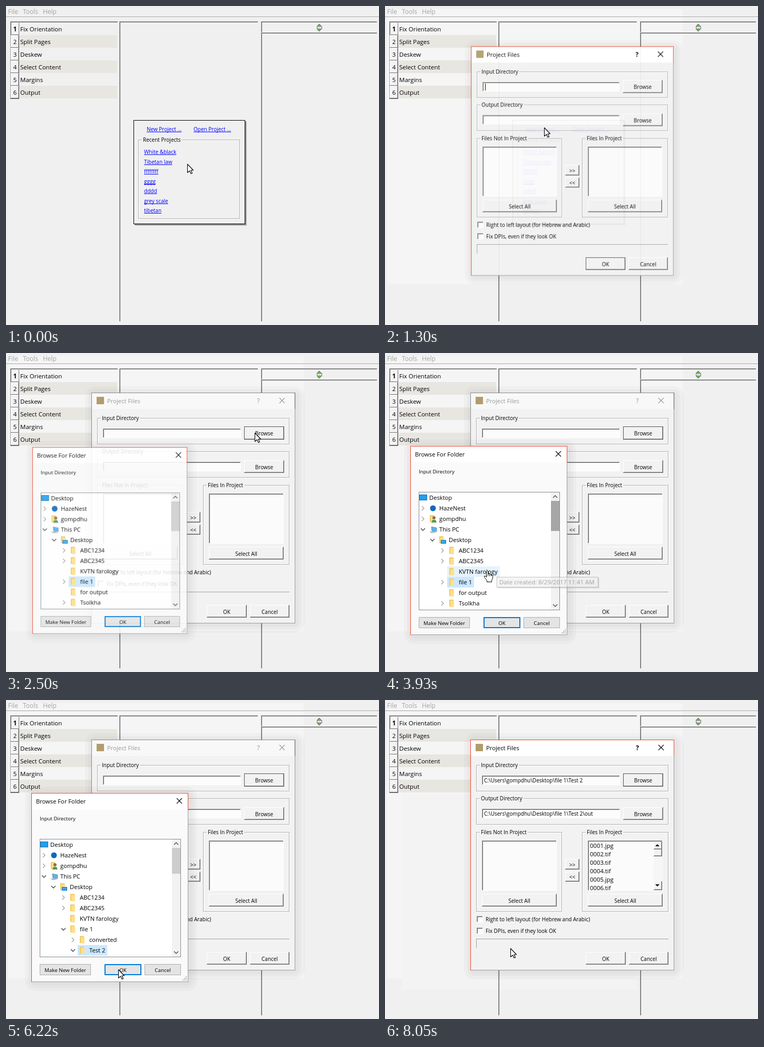
These frames come from a looping animation (708x604 px, 8700 ms). An HTML page with a canvas:

```html
<!DOCTYPE html>
<html lang="en">
<head>
<meta charset="utf-8">
<title>Project setup</title>
<style>
html, body { margin: 0; width: 708px; height: 604px; overflow: hidden; background: #f0f0f0; }
canvas { display: block; }
</style>
</head>
<body>
<canvas id="stage" width="708" height="604"></canvas>
<script>
const W = 708, H = 604, LOOP = 8700;
const stage = document.getElementById('stage');
const main = stage.getContext('2d');
const buffer = Object.assign(document.createElement('canvas'), { width: W, height: H });
const spare = buffer.getContext('2d');
let g = main;

const FACE = '#f0f0f0', BODY = '#f2f2f2', MID = '#a0a0a0', DARK = '#696969', RED = '#f2452f';
const USER = 'gompdhu';
const clamp = v => Math.max(0, Math.min(1, v));

// Progress that is held between evenly spaced screen updates.
function stepped(t, start, end, n) {
  if (t < start) return 0;
  const gap = n > 1 ? (end - start) / (n - 1) : Infinity;
  return Math.min(n, Math.floor((t - start + 20) / gap) + 1) / n;
}

function box(x, y, w, h, color) {
  g.fillStyle = color;
  g.fillRect(x, y, w, h);
}

function frame(x, y, w, h, color) {
  g.strokeStyle = color;
  g.lineWidth = 1;
  g.strokeRect(x + .5, y + .5, w - 1, h - 1);
}

function path(points, color, width = 1, close = false, fill) {
  g.beginPath();
  points.forEach(([x, y]) => g.lineTo(x, y));
  if (close) g.closePath();
  if (fill) { g.fillStyle = fill; g.fill(); }
  if (color) { g.strokeStyle = color; g.lineWidth = width; g.stroke(); }
}

function disc(x, y, r, color) {
  g.fillStyle = color;
  g.beginPath();
  g.arc(x, y, r, 0, Math.PI * 2);
  g.fill();
}

// Text is placed by the middle of its line; returns its width.
function text(str, x, mid, { size = 10, color = '#000', align = 'left', weight = '' } = {}) {
  g.font = `${weight} ${size}px "Open Sans", "Noto Sans", sans-serif`;
  g.textAlign = align;
  g.fillStyle = color;
  g.fillText(str, x, mid + Math.round(size * .36));
  return g.measureText(str).width;
}

function sunken(x, y, w, h, fill) {
  box(x, y, w, h, '#fff');
  box(x, y, w - 1, h - 1, MID);
  box(x + 1, y + 1, w - 2, h - 2, DARK);
  box(x + 2, y + 2, w - 3, h - 3, fill);
}

function raised(x, y, w, h) {
  box(x, y, w, h, DARK);
  box(x, y, w - 1, h - 1, '#fff');
  box(x + 1, y + 1, w - 2, h - 2, MID);
  box(x + 1, y + 1, w - 3, h - 3, BODY);
}

function button(label, x, y, w, h, focus) {
  raised(x, y, w, h);
  if (focus) frame(x, y, w, h, '#555');
  text(label, x + w / 2, y + h / 2 + .5, { align: 'center' });
}

function group(label, x, y, w, h, fill = BODY) {
  frame(x + 1, y + 1, w, h, '#fff');
  frame(x, y, w, h, '#b0b0b0');
  g.font = '10px "Open Sans", "Noto Sans", sans-serif';
  box(x + 7, y - 4, g.measureText(label).width + 4, 9, fill);
  text(label, x + 9, y);
}

function shadow(x, y, w, h) {
  g.fillStyle = 'rgba(0,0,0,.025)';
  for (const grow of [15, 9, 4]) {
    g.beginPath();
    g.roundRect(x + 3 - grow, y + 3 - grow, w + grow * 2, h + grow * 2, grow + 5);
    g.fill();
  }
}

// Draws a window, zooming slightly while it is see-through.
function fadeLayer(alpha, cx, cy, draw) {
  if (alpha <= 0) return;
  if (alpha >= 1) return draw();
  spare.clearRect(0, 0, W, H);
  g = spare;
  draw();
  g = main;
  const zoom = .9 + .1 * alpha;
  g.save();
  g.globalAlpha = alpha;
  g.translate(cx, cy);
  g.scale(zoom, zoom);
  g.drawImage(buffer, -cx, -cy);
  g.restore();
}

function cross(x, y, color) {
  path([[x - 5, y - 5], [x + 5, y + 5]], color, 1.1);
  path([[x + 5, y - 5], [x - 5, y + 5]], color, 1.1);
}

function edges(x, y, w, h, titleH, active) {
  frame(x, y, w, h, '#9a9a9a');
  const c = active ? RED : '#8c8c8c';
  box(x, y, w, 1, c);
  box(x, y, 1, h, c);
  box(x + w - 1, y, 1, titleH, active ? RED : '#555');
}

// Top and left side of a sunken panel.
function corner(x, y, w, h) {
  box(x, y, w, 1, MID);
  box(x, y, 1, h, MID);
  box(x + 1, y + 1, w - 1, 1, DARK);
  box(x + 1, y + 1, 1, h - 1, DARK);
}

function mainWindow(t) {
  box(0, 0, W, H, FACE);
  if (t >= 1040) box(4, 6, 561, 521, '#f5f5f5');
  if (t >= 6760) box(32, 178, 446, 371, '#f3f3f3');

  [['File', 4], ['Tools', 32], ['Help', 70]].forEach(([s, x]) =>
    text(s, x, 11, { size: 12, color: '#a3a3a3' }));
  box(0, 20, W, 1, MID);
  box(0, 21, W, 1, '#fff');

  corner(8, 29, 204, 147);
  ['Fix Orientation', 'Split Pages', 'Deskew', 'Select Content', 'Margins', 'Output'].forEach((s, i) => {
    const y = 32 + i * 24;
    if (i % 2) box(25, y - 1, 186, 24, '#e8e6e1');
    box(9, y, 15, 24, '#f3f3f3');
    box(9, y, 1, 24, i ? '#fff' : DARK);
    box(23, y, 1, 24, i ? MID : '#fff');
    box(24, y, 1, 24, DARK);
    if (i) box(9, y - 1, 15, 1, '#fff');
    box(9, y + 22, 16, 1, DARK);
    text(i + 1, 17, y + 12, { size: 11.5, align: 'center', weight: i ? '' : 'bold' });
    text(s, 27, y + 12, { size: 11.5 });
  });
  box(8, 175, 17, 1, DARK);

  corner(215, 29, 263, 568);
  corner(484, 29, 220, 21);
  box(485, 49, 219, 1, '#fff');
  corner(484, 50, 220, 547);

  path([[594.5, 34], [599, 39], [590, 39]], '#2f6e1f', 1, true, '#6cc04a');
  path([[594.5, 48], [599, 43], [590, 43]], '#2f6e1f', 1, true, '#6cc04a');
  box(590, 38, 10, 6, '#777');
  box(591, 39, 8, 4, '#dcdcdc');
}

function link(str, x, mid) {
  const w = text(str, x, mid, { color: '#00f' });
  box(x, Math.round(mid) + 5, w, 1, '#00f');
}

function startPanel() {
  box(245, 219, 212, 197, '#c4c4c4');
  box(244, 218, 212, 197, '#8f8f8f');
  box(242, 216, 212, 197, '#000');
  box(243, 217, 210, 195, FACE);
  link('New Project ...', 267, 233);
  link('Open Project ...', 356, 233);
  group('Recent Projects', 251, 253, 193, 150, FACE);
  ['White &black', 'Tibetan law', 'ffffffff', 'gggg', 'dddd', 'grey scale', 'tibetan']
    .forEach((s, i) => link(s, 262, Math.round(276 + i * 18.5)));
}

function fileList() {
  g.save();
  g.beginPath();
  g.rect(387, 268, 140, 92);
  g.clip();
  for (let i = 1; i <= 6; i++)
    text(`000${i}.${i % 4 === 1 ? 'jpg' : 'tif'}`, 389, 260 + i * 16, { size: 11.3 });
  box(510, 268, 17, 92, '#f6f6f6');
  raised(510, 268, 16, 15);
  raised(510, 283, 16, 13);
  raised(510, 343, 16, 17);
  path([[513, 277], [521, 277], [517, 273]], null, 0, true, '#000');
  path([[513, 349], [521, 349], [517, 353]], null, 0, true, '#000');
  g.restore();
}

function projectDialog(t) {
  const filled = t >= 6900, active = t < 2090 || filled, browsing = t >= 2090;
  const ink = active ? '#000' : '#999';
  shadow(162, 75, 387, 436);
  box(162, 75, 387, 436, BODY);
  box(162, 75, 387, 31, active ? '#fff' : '#f8f8f8');
  edges(162, 75, 387, 437, 31, active);
  box(172, 83, 14, 14, '#b39c6b');
  text('Project Files', 192, 91, { size: 11.3, color: ink });
  text('?', 479, 91, { size: 12, color: ink, align: 'center', weight: active ? 'bold' : '' });
  cross(524, 90, ink);

  const folder = `C:\\Users\\${USER}\\Desktop\\file 1\\Test 2`;
  [['Input Directory', 123, folder], ['Output Directory', 186, folder + '\\out']].forEach(([label, y, value], i) => {
    group(label, 173, y, 365, 50);
    sunken(184, y + 20, 262, 18, '#fcfcfc');
    if (filled) text(value, 188, y + 29);
    button('Browse', 452, y + (i ? 17 : 16), 76, i ? 24 : 25, !i && browsing);
  });
  if (!browsing) box(189, 146, 1, 13, '#000');

  [['Files Not In Project', 173, 163, 184], ['Files In Project', 374, 164, 385]].forEach(([label, x, w, lx]) => {
    group(label, x, 250, w, 151);
    sunken(lx, 266, 142, 95, '#fbfbfb');
    button('Select All', lx, 367, 142, 24);
  });
  if (filled) fileList();
  button('>>', 342, 301, 27, 20);
  button('<<', 342, 325, 27, 19);

  [['Right to left layout (for Hebrew and Arabic)', 415], ['Fix DPIs, even if they look OK', 437]].forEach(([s, y]) => {
    sunken(174, y - 6, 12, 12, '#fcfcfc');
    text(s, 191, y);
  });
  box(173, 452, 365, 1, MID);
  box(173, 452, 1, 18, MID);
  button('OK', 381, 477, 76, 24, !browsing);
  button('Cancel', 463, 477, 75, 24);
}

function folderIcon(x, y) {
  box(x + 1, y - 7, 8, 13, '#f3ca62');
  box(x + 3, y - 5, 7, 12, '#ffdf8d');
}

const icons = {
  desktop(x, y) { box(x, y - 6, 15, 11, '#1672b8'); box(x + 1, y - 5, 13, 9, '#22a0e8'); },
  cloud(x, y) { disc(x + 7, y, 5.5, '#1068bf'); },
  user(x, y) {
    folderIcon(x, y);
    disc(x + 9, y - 2, 3, '#9b6a43');
    path([[x + 4, y + 7], [x + 6, y + 2], [x + 12, y + 2], [x + 14, y + 7]], null, 0, true, '#4f9b57');
  },
  pc(x, y) {
    path([[x + 4, y - 5], [x + 14, y - 3], [x + 14, y + 4], [x + 5, y + 3]], '#7894aa', 1, true, '#58b3ec');
    path([[x, y + 4], [x + 9, y + 4], [x + 14, y + 6], [x + 4, y + 7]], null, 0, true, '#aab9c4');
  },
  folderDesk(x, y) { folderIcon(x, y); box(x + 4, y, 10, 7, '#1672b8'); box(x + 5, y + 1, 8, 5, '#35a9ec'); },
  folder: folderIcon
};

// Each row: label, depth, icon, arrow state.
const above = [
  ['Desktop', 0, 'desktop', ''], ['HazeNest', 1, 'cloud', '>'], [USER, 1, 'user', '>'],
  ['This PC', 1, 'pc', 'v'], ['Desktop', 2, 'folderDesk', 'v'],
  ['ABC1234', 3, 'folder', '>'], ['ABC2345', 3, 'folder', '>'], ['KVTN farology', 3, 'folder', '']
];

function treeRows(t) {
  if (t < 4470) return [...above, ['file 1', 3, 'folder', '>'], ['for output', 3, 'folder', ''], ['Tsolkha', 3, 'folder', '>']];
  return [...above, ['file 1', 3, 'folder', 'v'], ['converted', 4, 'folder', '>'],
    ['Test 2', 4, 'folder', t < 5700 ? '>' : 'v'], ['Test 3', 4, 'folder', '>']];
}

function chevron(x, y, state) {
  if (state === '>') path([[x - 2, y - 4], [x + 2, y], [x - 2, y + 4]], '#9a9a9a', 1.2);
  if (state === 'v') path([[x - 4, y - 2], [x, y + 2], [x + 4, y - 2]], '#404040', 1.3);
}

function tree(t, cursor) {
  box(64, 263, 268, 224, '#858a92');
  box(65, 264, 266, 222, '#fff');
  g.save();
  g.beginPath();
  g.rect(65, 264, 250, 222);
  g.clip();
  const scroll = t >= 4470 && t < 5700 ? 1 : 0;
  const chosen = t < 5700 ? 'file 1' : 'Test 2';
  const hover = cursor.hand ? Math.floor((cursor.y - 264) / 20) + scroll : -1;
  treeRows(t).forEach(([label, depth, icon, arrow], i) => {
    const y = 274 + (i - scroll) * 20;
    const ix = depth ? 65 + depth * 18.6 : 65;
    const tx = Math.round(84 + depth * 18.6);
    g.font = '11.2px "Open Sans", "Noto Sans", sans-serif';
    const tint = label === chosen ? '#cce8ff' : i === hover ? '#e5f3ff' : '';
    if (tint) box(tx - 22, y - 10, g.measureText(label).width + 26, 20, tint);
    chevron(Math.round(53 + depth * 18.6), y, arrow);
    icons[icon](Math.round(ix), y);
    text(label, tx, y, { size: 11.2 });
  });
  g.restore();

  box(315, 264, 16, 222, '#f2f2f2');
  const [top, size] = t < 4470 ? [280, 57] : t < 5700 ? [285, 53] : [280, 49];
  box(315, top, 16, size, t >= 3080 && t < 4470 ? '#a6a6a6' : '#cdcdcd');
  path([[319, 274], [323, 270], [327, 274]], '#555', 1.5);
  path([[319, 476], [323, 480], [327, 476]], '#555', 1.5);
}

function flatButton(label, x, w, main) {
  box(x, 500, w, 21, main ? '#0078d7' : '#adadad');
  const b = main ? 2 : 1;
  box(x + b, 500 + b, w - b * 2, 21 - b * 2, '#e4e4e4');
  text(label, x + w / 2, 511, { align: 'center', size: 9.8 });
}

function browseDialog(t, cursor) {
  shadow(48, 176, 297, 357);
  box(48, 176, 297, 357, '#fafafa');
  box(48, 176, 297, 31, '#fff');
  edges(48, 176, 298, 358, 31, true);
  text('Browse For Folder', 57, 192, { size: 11.2 });
  cross(329, 191, '#000');
  text('Input Directory', 64, 225, { size: 9.7 });
  tree(t, cursor);
  flatButton('Make New Folder', 64, 97);
  flatButton('OK', 187, 70, true);
  flatButton('Cancel', 263, 69);
  for (let r = 0; r < 3; r++)
    for (let c = 0; c <= r; c++) box(341 - c * 3, 523 + r * 3, 2, 2, '#b5b5b5');
}

function tooltip(str, x, y, w, alpha) {
  g.save();
  g.globalAlpha = alpha;
  box(x + 2, y + 2, w, 20, 'rgba(0,0,0,.16)');
  box(x, y, w, 20, '#fff');
  frame(x, y, w, 20, '#767676');
  text(str, x + 5, y + 10, { size: 11.4, color: '#575757' });
  g.restore();
}

// Each move: start, end, updates, the part of it spent moving, destination.
const moves = [
  [120, 760, 5, 0, 1, 302, 230],
  [1040, 1960, 8, 3 / 8, 1, 472, 151],
  [2090, 3080, 8, 1 / 2, 1, 322, 265],
  [3230, 3350, 2, 0, 1, 286, 280],
  [3650, 4200, 5, 0, .6, 193, 412],
  [3650, 4200, 5, .6, 1, 160, 441],
  [4470, 5400, 8, 0, .5, 175, 447],
  [4470, 5400, 8, .5, 1, 204, 459],
  [5700, 6640, 8, 0, 5 / 8, 213, 510],
  [6760, 7320, 5, 0, 1, 237, 481],
  [7620, 7620, 1, 0, 1, 237, 482],
  [7900, 8050, 2, 0, 1, 238, 470]
];

function cursorAt(t) {
  let x = 344, y = 299;
  for (const [start, end, n, from, to, tx, ty] of moves) {
    const q = clamp((stepped(t, start, end, n) - from) / (to - from));
    x += (tx - x) * q;
    y += (ty - y) * q;
  }
  const hand = (t < 1040 && y < 240) || (t >= 3650 && t < 5830 && y > 345 && y < 484);
  return { x: Math.round(x), y: Math.round(y), hand };
}

function drawCursor({ x, y, hand }) {
  g.save();
  g.translate(x + .5, y + .5);
  g.lineJoin = 'round';
  if (hand) {
    path([[-1, 1], [0, 0], [1, 0], [2, 1], [2, 6], [5, 6], [6, 7], [8, 7], [9, 8], [10, 8], [11, 10],
      [11, 14], [9, 18], [9, 21], [0, 21], [0, 18], [-5, 12], [-5, 10], [-3, 10], [-1, 12]], '#000', 1, true, '#fff');
    for (const fx of [2, 5, 8]) path([[fx, 7], [fx, 10]], '#000');
  } else {
    path([[0, 0], [0, 16], [4, 12.5], [6.5, 18], [9, 17], [6.5, 11.5], [11, 11.5]], '#000', 1.1, true, '#fff');
  }
  g.restore();
}

function render(t) {
  const cursor = cursorAt(t);
  const opening = stepped(t, 1040, 1960, 8);
  const browsing = stepped(t, 2090, 3080, 8);
  const closing = stepped(t, 6760, 7320, 5);
  const easeOut = p => 1 - clamp(1 - p) ** 2;

  mainWindow(t);
  if (opening < .5) startPanel();
  fadeLayer(easeOut(opening * 2), 356, 293, () => projectDialog(t));
  const shown = closing ? 1 - closing * 2 : easeOut(browsing * 1.28);
  fadeLayer(shown, 197, 355, () => browseDialog(t, cursor));

  if (t >= 3910 && t < 4180) tooltip('Date created: 8/29/2017 11:41 AM', 212, 424, 193, t < 4060 ? .5 : 1);
  if (t >= 4730 && t < 5700) {
    const late = t >= 5120;
    tooltip('Date created: 9/12/2017 3:21 PM', late ? 192 : 163, late ? 474 : 462, 184, 1);
  }
  drawCursor(cursor);
}

const begun = performance.now();
function tick() {
  render((performance.now() - begun) % LOOP);
  requestAnimationFrame(tick);
}
tick();
</script>
</body>
</html>
```
